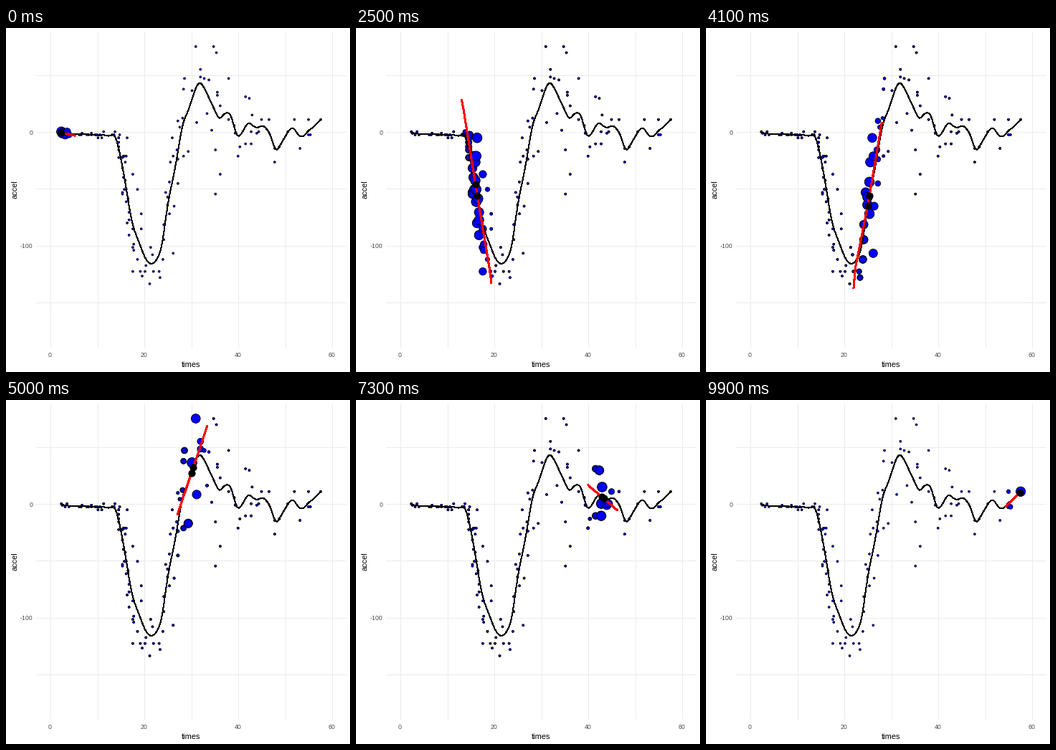
Animation, 480 px wide and 480 px high, one loop 10000 ms. Source, as a matplotlib script:

```python
import numpy as np
import matplotlib.pyplot as plt
from matplotlib.animation import FuncAnimation

SIZE, DPI = 480, 72          # at 72 dpi one point is one pixel
FRAMES, INTERVAL = 100, 100
BLUE, RED, GRID = "#0000ff", "#ff0000", "#ebebeb"

times = np.array([
    2.4, 2.6, 3.2, 3.6, 4, 6.2, 6.6, 6.8, 7.8, 8.2, 8.8, 8.8, 9.6, 10, 10.2, 10.6, 11, 11.4, 13.2,
    13.6, 13.8, 14.6, 14.6, 14.6, 14.6, 14.6, 14.6, 14.8, 15.4, 15.4, 15.4, 15.4, 15.6, 15.6, 15.8, 15.8, 16, 16,
    16.2, 16.2, 16.2, 16.4, 16.4, 16.6, 16.8, 16.8, 16.8, 17.6, 17.6, 17.6, 17.6, 17.8, 17.8, 18.6, 18.6, 19.2, 19.4,
    19.4, 19.6, 20.2, 20.4, 21.2, 21.4, 21.8, 22, 23.2, 23.4, 24, 24.2, 24.2, 24.6, 25, 25, 25.4, 25.4, 25.6,
    26, 26.2, 26.2, 26.4, 27, 27.2, 27.2, 27.2, 27.6, 28.2, 28.4, 28.4, 28.6, 29.4, 30.2, 31, 31.2, 32, 32,
    32.8, 33.4, 33.8, 34.4, 34.8, 35.2, 35.2, 35.4, 35.6, 35.6, 36.2, 36.2, 38, 38, 39.2, 39.4, 40, 40.4, 41.6,
    41.6, 42.4, 42.8, 42.8, 43, 44, 44.4, 45, 46.6, 47.8, 47.8, 48.8, 50.6, 52, 53.2, 55, 55, 55.4, 57.6])

accel = np.array([
    0, -1.3, -2.7, 0, -2.7, -2.7, -2.7, -1.3, -2.7, -2.7, -1.3, -2.7, -2.7, -2.7, -5.4, -2.7, -5.4, 0, -2.7,
    -2.7, 0, -13.3, -5.4, -5.4, -9.3, -16, -22.8, -2.7, -22.8, -32.1, -53.5, -54.9, -40.2, -21.5, -21.5, -50.8, -42.9, -26.8,
    -21.5, -50.8, -61.7, -5.4, -80.4, -59, -71, -91.1, -77.7, -37.5, -85.6, -123.1, -101.9, -99.1, -104.4, -112.5, -50.8, -123.1, -85.6,
    -72.3, -127.2, -123.1, -117.9, -134, -101.9, -108.4, -123.1, -123.1, -128.5, -112.5, -95.1, -81.8, -53.5, -64.4, -57.6, -72.3, -44.3, -26.8,
    -5.4, -107.1, -21.5, -65.6, -16, -45.6, -24.2, 9.5, 4, 12, -21.5, 37.5, 46.9, -17.4, 36.2, 75, 8.1, 54.9, 48.2,
    46.9, 16, 45.6, 1.3, 75, -16, -54.9, 69.6, 34.8, 32.1, -37.5, 22.8, 46.9, 10.7, 5.4, -1.3, -21.5, -13.3, 30.8,
    -10.7, 29.4, 0, -10.7, 14.7, -1.3, 0, 10.7, 10.7, -26.8, -14.7, -13.3, 0, 10.7, -14.7, -2.7, 10.7, -2.7, 10.7])


def px(t):
    return 61.55 + 6.555 * np.asarray(t)


def py(a):
    return 144.7 - 1.584 * np.asarray(a)


def kernel(x0):
    return np.exp(-(times - x0) ** 2 / 2)


def local_fit(x0):
    """Value and slope of the Gaussian-weighted line at x0."""
    w, d = kernel(x0), times - x0
    s0, s1, s2 = w.sum(), (w * d).sum(), (w * d * d).sum()
    t0, t1 = (w * accel).sum(), (w * d * accel).sum()
    det = s0 * s2 - s1 * s1
    return (s2 * t0 - s1 * t1) / det, (s0 * t1 - s1 * t0) / det


# Centres of the local fits, each shown in the nearest frame
centres = 2.4 + 0.39 * np.arange(142)
slots = np.rint((centres - 2.385) / (55.2 / (FRAMES - 1))).astype(int)

fig = plt.figure(figsize=(SIZE / DPI, SIZE / DPI), dpi=DPI, facecolor="white")
ax = fig.add_axes([0, 0, 1, 1])
ax.set_xlim(0, SIZE)
ax.set_ylim(SIZE, 0)
ax.axis("off")

for t in range(0, 61, 10):
    x = np.floor(px(t)) + 0.5
    ax.plot([x, x], [5, 445], color=GRID, lw=1, zorder=0)
for a in range(-150, 51, 50):
    y = np.floor(py(a)) + 0.5
    ax.plot([42, 474], [y, y], color=GRID, lw=1, zorder=0)

tick = dict(family="Liberation Sans", size=8.8, color="#4d4d4d", va="baseline")
title = dict(family="Liberation Sans", size=11, color="black", va="baseline", ha="center")
for t in (0, 20, 40, 60):
    ax.text(px(t) - 0.3, 459, str(t), ha="center", **tick)
for a in (0, -100):
    ax.text(37.2, py(a) + 4, str(a), ha="right", **tick)
ax.text(258, 473, "times", **title)
ax.text(16, 225, "accel", rotation=90, rotation_mode="anchor", **title)

points = ax.scatter([], [], marker="o", facecolor=BLUE, edgecolor="black", lw=0.8, zorder=2)
grid = np.linspace(2.4, 57.6, 150)
ax.plot(px(grid), py([local_fit(g)[0] for g in grid]), color="black", lw=1,
        antialiased=False, zorder=3)
tangent, = ax.plot([], [], color=RED, lw=2, antialiased=False,
                   solid_capstyle="butt", zorder=4)
dots = ax.scatter([], [], marker="o", s=10.2 ** 2, color="black", lw=0, zorder=5)

cloud = np.column_stack([px(times), py(accel)])


def draw(k):
    active = centres[slots == k]
    radii, path, spots = [], [], []
    for c in active:
        value, slope = local_fit(c)
        radii.append(1.42 + 5.33 * np.sqrt(kernel(c)))
        spots.append((px(c), py(value)))
        path += [(c + d, value + slope * d) for d in (-3, 0, 3)
                 if -1e-6 <= c + d <= 60 + 1e-6]
    points.set_offsets(np.tile(cloud, (len(active), 1)))
    points.set_sizes((2 * np.concatenate(radii)) ** 2)
    # Overlapping fits share one line, joined in order of time
    t, a = np.array(sorted(path)).T
    tangent.set_data(px(t), py(a))
    dots.set_offsets(spots)
    return points, tangent, dots


anim = FuncAnimation(fig, draw, frames=FRAMES, interval=INTERVAL, repeat=True)
plt.show()
```
